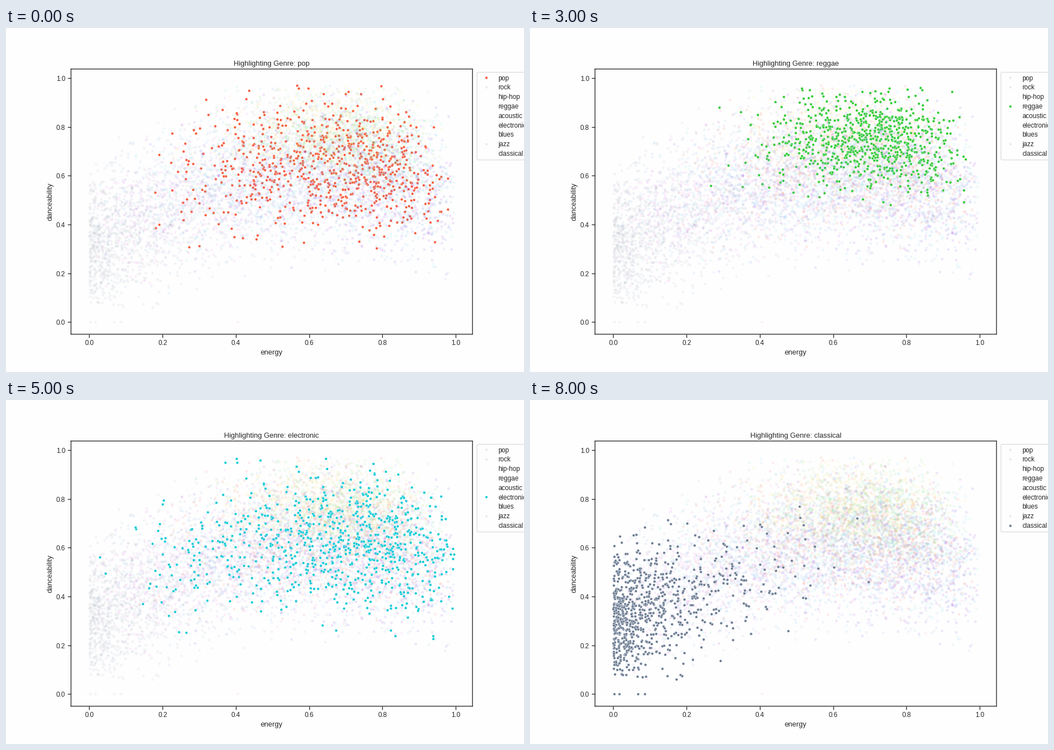
Write a matplotlib script that moves like this. It is 917 px wide and 611 px high and loops after 9000 ms.

```python
import matplotlib.pyplot as plt
import numpy as np
from matplotlib.animation import FuncAnimation
from matplotlib.colors import to_rgba
from matplotlib.lines import Line2D

INK = "#262626"
PAPER = "#fefefe"
COUNT = 800
SIZE = 20

plt.rcParams.update({
    "font.family": "Liberation Sans",
    "font.size": 12,
    "axes.titlesize": 12,
    "axes.labelsize": 12,
    "xtick.labelsize": 11,
    "ytick.labelsize": 11,
    "legend.fontsize": 11,
    "text.color": INK,
    "figure.facecolor": PAPER,
    "axes.facecolor": PAPER,
    "axes.labelcolor": INK,
    "axes.edgecolor": INK,
    "axes.linewidth": 1.25,
    "xtick.color": INK,
    "ytick.color": INK,
    "xtick.major.size": 6,
    "ytick.major.size": 6,
    "xtick.major.width": 1.25,
    "ytick.major.width": 1.25,
    "path.snap": False,
})

# colour, mean energy, energy focus, peak danceability, spread
GENRES = {
    "pop": ("#fa5a3c", .64, 6.5, .66, .135),
    "rock": ("#8228de", .7, 5, .6, .14),
    "hip-hop": ("#ffcf10", .65, 12, .77, .1),
    "reggae": ("#32cb35", .69, 12, .76, .1),
    "acoustic": ("#3d7fba", .42, 3.6, .6, .14),
    "electronic": ("#10cbd6", .65, 5, .63, .14),
    "blues": ("#1e8cfc", .61, 4, .59, .145),
    "jazz": ("#e681e6", .38, 4, .58, .14),
    "classical": ("#6b7b92", .12, 6, .51, .13),
}
NAMES = list(GENRES)
VISIBLE_FAINT = {"pop", "rock", "jazz"}
UNDANCEABLE = {"jazz": [.405], "classical": [.002, .017, .068, .085]}


def sample(genre, rng):
    """Danceability arches over energy, with noise cut at 2.7 sigma."""
    _, mean, focus, peak, spread = GENRES[genre]
    energy = rng.beta(mean * focus, (1 - mean) * focus, 2 * COUNT)
    noise = rng.normal(0, 1, energy.size)
    dance = peak - .6 * (energy - .6) ** 2 + spread * noise
    keep = (abs(noise) < 2.7) & (dance > .06) & (dance < .97) & (energy < .995)
    zeros = UNDANCEABLE.get(genre, [])
    return (np.append(energy[keep][:COUNT], zeros),
            np.append(dance[keep][:COUNT], np.zeros(len(zeros))))


def dot_color(genre, on):
    alpha = 1 if on else .11 if genre in VISIBLE_FAINT else .07
    return to_rgba(GENRES[genre][0], alpha)


def key_color(genre, on):
    if on:
        return GENRES[genre][0]
    return "#f1e6ec" if genre in VISIBLE_FAINT else "none"


fig, ax = plt.subplots(figsize=(12, 8), dpi=917 / 12)
fig.subplots_adjust(left=.1255, right=.9005, bottom=.1098, top=.8803)
ax.set(xlim=(-.0498, 1.0458), ylim=(-.0494, 1.0374),
       xlabel="energy", ylabel="danceability")

rng = np.random.default_rng(7)
clouds = {g: ax.scatter(*sample(g, rng), s=SIZE, linewidths=.4) for g in NAMES}

handles = [Line2D([], [], ls="", marker="o", ms=SIZE ** .5, mew=.4,
                  mec=PAPER, label=g) for g in NAMES]
legend = ax.legend(handles=handles, loc="upper left",
                   bbox_to_anchor=(1.003, 1), labelspacing=.41)


def update(i):
    ax.set_title(f"Highlighting Genre: {NAMES[i]}")
    for genre, key in zip(NAMES, legend.legend_handles):
        on = genre == NAMES[i]
        clouds[genre].set_facecolor(dot_color(genre, on))
        clouds[genre].set_edgecolor(to_rgba("w", 1 if on else .1))
        key.set_markerfacecolor(key_color(genre, on))


anim = FuncAnimation(fig, update, frames=len(NAMES), interval=1000,
                     repeat=True, repeat_delay=0)
plt.show()
```
